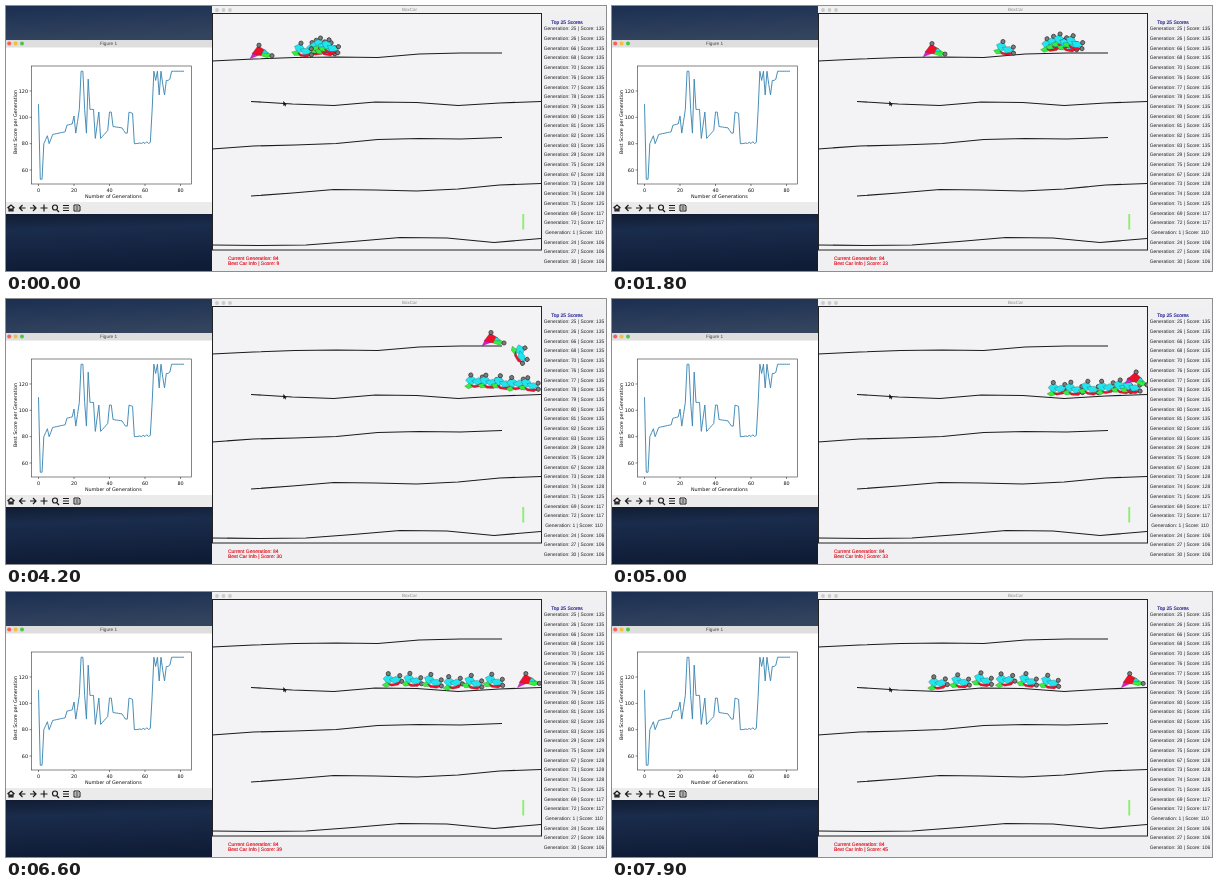
Write an HTML page that moves like this. It is 600 px wide and 265 px high and loops after 8000 ms.

```html
<!DOCTYPE html>
<html lang="en">
<head>
<meta charset="utf-8">
<title>BoxCar</title>
<style>
html, body { margin: 0; width: 100%; height: 100%; overflow: hidden; background: #14233f; }
svg { display: block; width: 600px; height: 265px; text-rendering: geometricPrecision; }
text { font-family: "Liberation Sans", Arial, sans-serif; font-size: 4.95px; }
.plot text { font-family: "DejaVu Sans", sans-serif; font-size: 4.85px; fill: #111; }
.plot .title { font: 4.7px "Liberation Sans", sans-serif; fill: #444; }
.mid { text-anchor: middle; }
.end { text-anchor: end; }
.track polyline { fill: none; stroke: #1c1c1c; stroke-width: 1.1; stroke-linejoin: round; }
.icons { fill: none; stroke: #1a1a1a; stroke-width: 1.2; }
.part { stroke: #333; stroke-width: .25; }
.wheel { fill: #7c7c7c; stroke: #2b2b2b; stroke-width: .7; }
</style>
</head>
<body>
<svg viewBox="0 0 600 265">
  <defs>
    <linearGradient id="sky" x2=".25" y2="1">
      <stop offset="0" stop-color="#1b2f52"/>
      <stop offset="1" stop-color="#33445e"/>
    </linearGradient>
    <linearGradient id="dune" x2=".1" y2="1">
      <stop offset="0" stop-color="#101b30"/>
      <stop offset=".3" stop-color="#1a2c4c"/>
      <stop offset="1" stop-color="#0f1c36"/>
    </linearGradient>
    <clipPath id="field"><rect x="206" y="8" width="330" height="236"/></clipPath>
  </defs>

  <rect width="206" height="36" fill="url(#sky)"/>
  <rect y="207" width="206" height="58" fill="url(#dune)"/>

  <g class="plot">
    <rect y="34" width="206" height="174" fill="#fff"/>
    <rect y="34" width="206" height="7.5" fill="#dedede"/>
    <circle cx="3.2" cy="37.6" r="2" fill="#f7605a"/>
    <circle cx="9.6" cy="37.6" r="2" fill="#f5bd40"/>
    <circle cx="16" cy="37.6" r="2" fill="#4fc544"/>
    <text x="102.5" y="39.3" class="mid title">Figure 1</text>
    <rect x="25.5" y="60" width="160" height="118" fill="none" stroke="#333" stroke-width=".6"/>
    <g id="ticks"></g>
    <polyline id="curve" fill="none" stroke="#3f88b5" stroke-width=".95" stroke-linejoin="round"/>
    <text x="107.3" y="191.6" class="mid">Number of Generations</text>
    <text class="mid" transform="translate(11 116) rotate(-90)">Best Score per Generation</text>
    <rect y="196" width="206" height="12" fill="#ebebeb"/>
    <g class="icons">
      <path d="M1.5 202L5 199L8.5 202M3 201.500V205H4.300V203H5.700V205H7V201.500"/>
      <path d="M19.500 202H13.500M16.500 199L13.500 202L16.500 205"/>
      <path d="M24 202H30M27 199L30 202L27 205"/>
      <path d="M34.500 202H41.500M38 198.500V205.500"/>
      <path d="M51 204L53 206"/><circle cx="49" cy="201.500" r="2.500"/>
      <path d="M57 199.500H63M57 202H63M57 204.500H63" stroke-width="1"/>
      <path d="M68 199H73L74 200V205H68ZM69.500 201H72.500M69.500 203H72.500" stroke-width="1"/>
    </g>
  </g>

  <rect x="206" width="394" height="265" fill="#f0eff1"/>
  <rect x="206.500" y="7.500" width="329" height="236.500" fill="#f3f2f4" stroke="#222"/>
  <rect x="206" width="394" height="7" fill="#f1f1f1"/>
  <g fill="#cbcbcb">
    <circle cx="211" cy="4" r="1.900"/><circle cx="217.500" cy="4" r="1.900"/><circle cx="224" cy="4" r="1.900"/>
  </g>
  <text x="403.500" y="5.300" class="mid" style="font-size:4.500px;fill:#888">BoxCar</text>

  <g class="track" id="track"></g>
  <rect x="516.300" y="208" width="1.900" height="15.500" fill="#8eee72"/>
  <g id="cars" clip-path="url(#field)"></g>
  <path d="M277.300 95V100L278.500 99L279.200 100.500L280 100L279.400 98.700L280.700 98.500Z" fill="#111"/>

  <g fill="#e00a18" stroke="#e00a18" stroke-width=".12">
    <text x="222" y="253.700">Current Generation: 84</text>
    <text x="222" y="258.700" id="score"></text>
  </g>
  <text x="561" y="18.300" class="mid" fill="#11118c" stroke="#11118c" stroke-width=".12">Top 25 Scores</text>
  <g id="scores" fill="#222"></g>
</svg>

<script>
const $ = id => document.getElementById(id);

function add(parent, tag, attrs, text) {
  const el = document.createElementNS('http://www.w3.org/2000/svg', tag);
  for (const k in attrs) el.setAttribute(k, attrs[k]);
  if (text !== undefined) el.textContent = text;
  return parent.appendChild(el);
}

// Linear interpolation through [position, value] pairs
function lerp(keys, p) {
  const i = keys.findIndex(k => k[0] >= p);
  if (i < 0) return keys[keys.length - 1][1];
  if (i === 0) return keys[0][1];
  const [a, u] = keys[i - 1], [b, v] = keys[i];
  return u + (v - u) * (p - a) / (b - a);
}

// Score plot: turning points, with a small ripple on the quiet stretch
const plotX = n => 32.5 + n * 1.775;
const plotY = s => 164 - (s - 60) * 1.317;
const turns = [[0, 110], [1, 53], [2, 53], [3, 80], [5, 86], [6, 80], [8, 87], [15, 89],
  [16, 94], [19, 95], [20, 101], [21, 88], [23, 106], [24, 135], [25, 135], [26, 106],
  [27, 88], [28, 129], [29, 106], [31, 106], [32, 84], [34, 104], [35, 84], [39, 90],
  [40, 104], [41, 104], [42, 93], [47, 92], [49, 88], [50, 88], [51, 104], [53, 103],
  [54, 80], [63, 81], [64, 105], [65, 135], [66, 128], [67, 135], [68, 117], [69, 135],
  [70, 125], [71, 117], [72, 128], [73, 128], [74, 129], [75, 135]];
const best = Array.from({ length: 83 }, (_, n) =>
  lerp(turns, n) + (n > 54 && n < 63 ? Math.cos(n * 3) : 0));
$('curve').setAttribute('points', best.map((s, n) => plotX(n) + ',' + plotY(s)).join(' '));

const tick = d => add($('ticks'), 'path', { d, stroke: '#333', 'stroke-width': .6 });
for (let n = 0; n <= 80; n += 20) {
  tick(`M${plotX(n)} 178v2`);
  add($('ticks'), 'text', { x: plotX(n), y: 185.8, class: 'mid' }, n);
}
for (let s = 60; s <= 120; s += 20) {
  tick(`M25.5 ${plotY(s)}h-2`);
  add($('ticks'), 'text', { x: 22, y: plotY(s) + 1.8, class: 'end' }, s);
}

// High scores
best.map((score, n) => ({ score, gen: n + 1 }))
  .sort((a, b) => b.score - a.score)
  .slice(0, 25)
  .forEach(({ score, gen }, i) => add($('scores'), 'text',
    { x: 568, y: 24.4 + i * 9.69, class: 'mid' }, `Generation: ${gen} | Score: ${score}`));

// Ground: evenly spaced heights between two ends
function ground(from, to, ...heights) {
  const points = heights.map((y, i) => [from + (to - from) * i / (heights.length - 1), y]);
  add($('track'), 'polyline', { points: points.join(' ') });
  return points;
}
const upper = ground(206, 496, 55, 53, 51.5, 51, 51.5, 48, 47, 47);
const lower = ground(245, 535, 95.5, 98, 99.5, 96, 96.5, 99.5, 97, 95.5);
ground(206, 496, 143, 140, 139, 137.5, 133.5, 132.5, 133, 131.5);
ground(245, 535, 190, 187, 183.5, 184, 185, 183, 179, 177.5);
ground(206, 535, 239, 239.5, 239, 235.5, 231.5, 232, 236.5, 232.5);

// Cars
const RED = '#f0102c', GREEN = '#35ee3f', CYAN = '#20e4ee', PINK = '#e416d6';
const leader = {
  parts: [['-12,7 -9,1 -2,3', PINK], ['-10,2 -4,-6 4,-1 -1,4', RED],
    ['-1,4 2,-2 11,4 5,6', GREEN], ['0,1 3,-2 6,2', CYAN]],
  wheels: [[-3, -6.5], [10, 4]]
};
const runner = {
  parts: [['-8,-3 -2,-7 3,-1 -4,4', CYAN], ['-2,-1 5,-3 10,0 3,5', CYAN],
    ['-10,3 -5,1 0,5 -7,6', GREEN], ['-4,3 2,4 11,2 6,6 -1,6', RED]],
  wheels: [[-2, -7], [9, -3], [10, 3]]
};

function makeCar(shape, xAt, opts) {
  const el = add($('cars'), 'g', {});
  shape.parts.forEach(([points, fill]) => add(el, 'polygon', { points, fill, class: 'part' }));
  shape.wheels.forEach(([cx, cy]) => add(el, 'circle', { cx, cy, r: 2.1, class: 'wheel' }));
  return { el, xAt, lift: 7, tilt: 0, tilt2: 0, hop: 0, ...opts };
}

// The pack shares one rear position and one gap between cars
const rear = [[0, 309], [1800, 438], [2450, 492], [2900, 514], [3300, 503],
  [4200, 468], [5900, 418], [7900, 325]];
const gap = [[0, 3.5], [1800, 5.8], [2450, 2.5], [2900, 3], [4200, 13.7], [5900, 19], [7900, 22.5]];
const cars = Array.from({ length: 5 }, (_, i) => makeCar(runner,
  t => lerp(rear, t) + lerp(gap, t) * i,
  { drop: 2560 - i * 55, lift: 8 + i % 3 * 2, tilt: i * 6 - 8,
    tilt2: 12 * Math.sin(i * 4 - 1), spin: 60 - i * 25, hop: 8 - i * 1.5 }));

const chaser = [[0, 296], [1800, 392], [2900, 447], [4200, 514], [4700, 520], [5900, 514], [7900, 437]];
cars.push(makeCar(runner, t => lerp(chaser, t), { drop: 3800, tilt: 8, tilt2: 6, spin: 65 }));

const last = [[0, 256], [1800, 323], [2900, 389], [4200, 488], [4900, 526], [7900, 521]];
cars.push(makeCar(leader, t => lerp(last, t), { drop: 4330, tilt2: -3, spin: 28 }));

const GRAVITY = 89;
function pose(car, t) {
  const x = car.xAt(t);
  const top = lerp(upper, x) - car.lift;
  const floor = lerp(lower, x) - 8;
  const s = Math.max(0, t - car.drop) / 1000;
  const fall = Math.min(1, GRAVITY * s * s / (floor - top));
  const hop = fall < 1 ? 0 : car.hop * Math.max(0, 1 - Math.abs(t - 4200) / 900);
  const angle = car.tilt + (car.tilt2 - car.tilt) * fall + car.spin * Math.sin(Math.PI * fall);
  const y = top + (floor - top) * fall - hop;
  car.el.setAttribute('transform', `translate(${x} ${y}) rotate(${angle})`);
}

const scoreKeys = [[0, 9], [1800, 23], [5900, 36.3], [7900, 46]];
const LOOP = 8000, STEP = 100;
function draw() {
  const t = Math.floor(performance.now() % LOOP / STEP) * STEP;
  cars.forEach(car => pose(car, t));
  $('score').textContent = 'Best Car Info | Score: ' + Math.floor(Math.min(45, lerp(scoreKeys, t)));
  requestAnimationFrame(draw);
}
draw();
</script>
</body>
</html>
```
